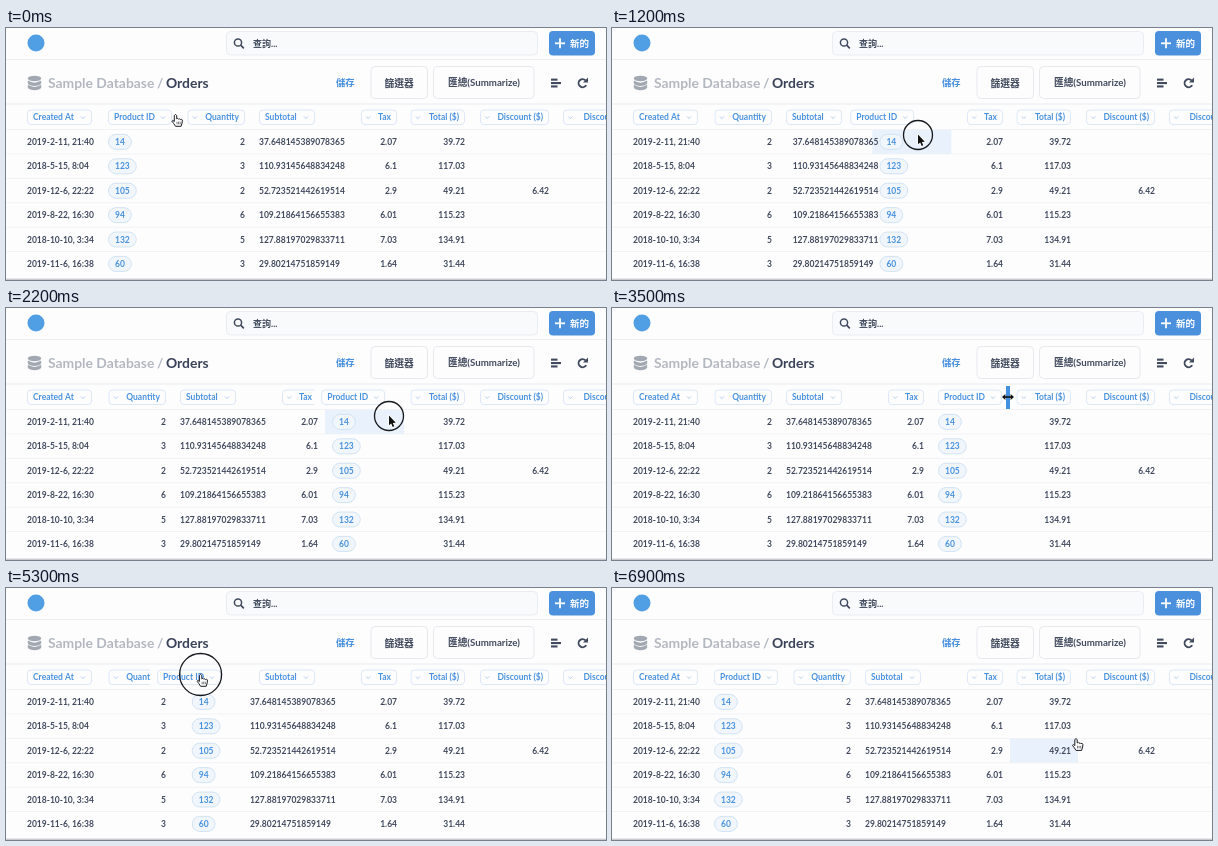
Recreate the animation shown at these times as an HTML page with a canvas. Size 600 px wide and 252 px high, loop 7 s.

```html
<!DOCTYPE html>
<html lang="zh-Hant">
<head>
<meta charset="utf-8">
<title>Orders table</title>
<style>
html, body { margin: 0; width: 100%; height: 100%; overflow: hidden; background: #fdfdfe; }
canvas { display: block; width: 600px; height: 252px; }
</style>
</head>
<body>
<canvas id="stage"></canvas>
<script>
const W = 600, H = 252, LOOP = 7000, STEP = 100;
const FONT = 'Lato, "Noto Sans CJK TC", "Noto Sans CJK JP", "Noto Sans CJK", sans-serif';
const BLUE = '#4a92df', DARK = '#424a5e', GREY = '#b3b8c0', PAGE = '#fdfdfe';
const HEAD_TOP = 76, BODY_TOP = 101.7, ROW_H = 24.4, PAD = 7;

const canvas = document.getElementById('stage');
const ctx = canvas.getContext('2d');
const dpr = window.devicePixelRatio || 1;
canvas.width = W * dpr;
canvas.height = H * dpr;

// swap: [time it gives way to the dragged column, time it returns]
const cols = [
  { name: 'Created At', left: 14, width: 81, pill: 65,
    data: ['2019-2-11, 21:40', '2018-5-15, 8:04', '2019-12-6, 22:22', '2019-8-22, 16:30', '2018-10-10, 3:34', '2019-11-6, 16:38'] },
  { name: 'Product ID', left: 95, width: 79, pill: 64, badge: true,
    data: ['14', '123', '105', '94', '132', '60'] },
  { name: 'Quantity', left: 174, width: 72, pill: 57.5, right: true, swap: [890, 5390],
    data: ['2', '3', '2', '6', '5', '3'] },
  { name: 'Subtotal', left: 246, width: 102, pill: 56, swap: [1070, 5180],
    data: ['37.648145389078365', '110.93145648834248', '52.723521442619514', '109.21864156655383', '127.88197029833711', '29.80214751859149'] },
  { name: 'Tax', left: 348, width: 50, pill: 36, right: true, swap: [1900, 5010],
    data: ['2.07', '6.1', '2.9', '6.01', '7.03', '1.64'] },
  { name: 'Total ($)', left: 398, width: 68, pill: 54.5, right: true,
    data: ['39.72', '117.03', '49.21', '115.23', '134.91', '31.44'] },
  { name: 'Discount ($)', left: 466, width: 84, pill: 69, right: true,
    data: ['', '', '6.42', '', '', ''] },
  { name: 'Discount (%)', left: 550, width: 88, pill: 74, right: true, data: [] }
];
const product = cols[1];
const movers = cols.filter(c => c.swap);

const drags = [
  { from: 800, to: 2400, grip: 74.8, ring: 14.5, arrow: true },
  { from: 4700, to: 6300, grip: 50.5, ring: 21 }
];

// pointer hot spot: time, x, y
const path = [
  [0, 169.5, 86.5], [100, 170, 87], [300, 170, 87], [400, 170.5, 87], [700, 170.5, 87],
  [800, 180, 89], [900, 212, 95], [1000, 268, 104], [1100, 297, 107], [1200, 306, 107],
  [1500, 316, 107], [1700, 339, 108], [1900, 368, 108], [2100, 382, 108], [2300, 384, 108],
  [2400, 392, 100], [2600, 404, 92], [2700, 404, 92], [3100, 400.5, 93], [3300, 397, 89.5],
  [3500, 396, 89], [4000, 395.5, 89], [4200, 393.5, 88], [4300, 392, 87], [4400, 392.5, 87],
  [4600, 392.5, 87], [4700, 377.3, 86.5], [4900, 361, 87], [5000, 345, 87], [5180, 267, 86.5],
  [5300, 194.6, 86.5], [5400, 177, 87], [5600, 155, 89], [6200, 134, 95], [6400, 190, 108],
  [6600, 340, 134], [6800, 446, 149], [6900, 464, 150.6], [7000, 464, 150.6]
];

function pointerAt(t) {
  let i = 0;
  while (i < path.length - 2 && path[i + 1][0] <= t) i++;
  const [t0, x0, y0] = path[i], [t1, x1, y1] = path[i + 1];
  const p = (t - t0) / (t1 - t0);
  return { x: x0 + (x1 - x0) * p, y: y0 + (y1 - y0) * p };
}

// CSS "ease": cubic-bezier(.25, .1, .25, 1)
function ease(x) {
  if (x <= 0) return 0;
  if (x >= 1) return 1;
  let lo = 0, hi = 1, u = 0.5;
  for (let i = 0; i < 20; i++) {
    u = (lo + hi) / 2;
    const bx = 0.75 * u * (1 - u) + u ** 3;
    if (bx < x) lo = u; else hi = u;
  }
  return 0.3 * u * (1 - u) ** 2 + 3 * u * u * (1 - u) + u ** 3;
}

// Left edge of every column; cells glide for `span` ms, headers snap
function layout(t, span) {
  const lefts = new Map(cols.map(c => [c, c.left]));
  let x = product.left;
  for (const c of movers) {
    const [out, back] = c.swap;
    const s = ease((t - out) / span) - ease((t - back) / span);
    lefts.set(c, c.left - product.width * s);
    x += c.width * s;
  }
  lefts.set(product, x);
  return lefts;
}

function text(str, x, cy, size, color, align = 'left') {
  ctx.font = `700 ${size}px ${FONT}`;
  ctx.textAlign = align;
  ctx.fillStyle = color;
  ctx.fillText(str, x, cy + size * 0.36);
}

function rect(x, y, w, h, color) {
  ctx.fillStyle = color;
  ctx.fillRect(x, y, w, h);
}

function box(x, y, w, h, r, fill, stroke, line = 1) {
  ctx.beginPath();
  ctx.roundRect(x, y, w, h, r);
  if (fill) { ctx.fillStyle = fill; ctx.fill(); }
  if (stroke) { ctx.strokeStyle = stroke; ctx.lineWidth = line; ctx.stroke(); }
}

function line(points, color, width) {
  ctx.beginPath();
  points.forEach(([x, y], i) => i ? ctx.lineTo(x, y) : ctx.moveTo(x, y));
  ctx.strokeStyle = color;
  ctx.lineWidth = width;
  ctx.stroke();
}

function circle(x, y, r, color, width) {
  ctx.beginPath();
  ctx.arc(x, y, r, 0, Math.PI * 2);
  if (width) { ctx.strokeStyle = color; ctx.lineWidth = width; ctx.stroke(); }
  else { ctx.fillStyle = color; ctx.fill(); }
}

function drawTopBar() {
  circle(30, 15, 8.5, '#509ee3');
  box(220.5, 3.5, 311, 23.5, 4, '#f8fafb', '#e9edf1');
  circle(232, 14.5, 3.6, DARK, 1.5);
  line([[234.7, 17.2], [237.8, 20.3]], DARK, 1.7);
  text('查詢...', 247, 15.5, 9, DARK);
  box(543, 3, 46, 24.5, 4, '#4a90dd');
  line([[549, 15.3], [559, 15.3]], '#fff', 1.8);
  line([[554, 10.3], [554, 20.3]], '#fff', 1.8);
  text('新的', 564, 15.3, 9.5, '#fff');
  rect(0, 31, W, 1, '#eeeff2');
}

function drawDatabaseIcon() {
  ctx.fillStyle = '#a2a8b1';
  ctx.beginPath();
  ctx.ellipse(28.5, 50.5, 6.7, 2.7, 0, 0, Math.PI * 2);
  ctx.fill();
  for (const y of [52.6, 56.8]) {
    ctx.beginPath();
    ctx.moveTo(21.8, y);
    ctx.quadraticCurveTo(28.5, y + 4.2, 35.2, y);
    ctx.lineTo(35.2, y + 2.7);
    ctx.bezierCurveTo(34, y + 6.2, 23, y + 6.2, 21.8, y + 2.7);
    ctx.fill();
  }
}

function drawTitleBar() {
  drawDatabaseIcon();
  text('Sample Database', 42, 55, 13.9, GREY);
  text('/', 151, 55, 13.9, GREY);
  text('Orders', 160, 55, 13.9, '#3b4358');
  text('儲存', 330, 55, 9.3, BLUE);
  box(365, 38.5, 56.5, 32, 4, PAGE, '#e7e9ed');
  text('篩選器', 378.5, 55, 9.8, DARK);
  box(427.5, 38.5, 100.5, 32, 4, PAGE, '#e7e9ed');
  text('匯總(Summarize)', 442, 55, 9.7, DARK);

  [6.5, 10, 6.5].forEach((w, i) => rect(545, 50.6 + i * 3.4, w, 2.1, DARK));
  ctx.beginPath();
  ctx.arc(576.6, 55.2, 4, -0.75, 0.5, true);
  ctx.strokeStyle = DARK;
  ctx.lineWidth = 1.9;
  ctx.stroke();
  ctx.fillStyle = DARK;
  ctx.beginPath();
  ctx.moveTo(582, 49.5);
  ctx.lineTo(582, 54.5);
  ctx.lineTo(577, 54.5);
  ctx.fill();
}

function drawCells(col, left) {
  col.data.forEach((value, row) => {
    const cy = BODY_TOP + ROW_H * (row + 0.5);
    if (col.badge) {
      const w = value.length * 4.93 + 14;
      box(left + PAD + 0.5, cy - 7.5, w - 1, 15, 7.5, '#f0f6fc', '#cfe0f1', 0.9);
      text(value, left + PAD + w / 2, cy, 8.5, BLUE, 'center');
    } else if (col.right) {
      text(value, left + col.width - PAD, cy, 8.5, DARK, 'right');
    } else {
      text(value, left + PAD, cy, 8.5, DARK);
    }
  });
}

function drawHover(lefts, p) {
  const row = Math.floor((p.y - BODY_TOP) / ROW_H);
  if (row < 0) return;
  const col = cols.find(c => p.x >= lefts.get(c) && p.x < lefts.get(c) + c.width);
  if (col) rect(lefts.get(col), BODY_TOP + row * ROW_H, col.width, ROW_H, '#e9f2fc');
}

function drawHeader(col, left) {
  const overflow = left + col.width > W;
  const x = col.right && !overflow ? left + col.width - PAD - col.pill : left + PAD;
  const cy = 89.3;
  box(x + 0.5, 82, col.pill - 1, 14.5, 3.5, PAGE, '#d8e6f5', 0.9);
  text(col.name, x + (col.right ? col.pill - 6 : 6), cy, 8.5, BLUE, col.right ? 'right' : 'left');
  const cx = x + (col.right ? 7.3 : col.pill - 9);
  line([[cx - 2, cy - 0.8], [cx, cy + 1.2], [cx + 2, cy - 0.8]], '#a9c9ec', 0.9);
}

function drawTable(t, p, drag) {
  const cells = layout(t, 200), heads = layout(t, 0.001);
  rect(0, HEAD_TOP - 0.5, W, 1, '#e9ebef');
  drawHover(cells, p);
  for (let row = 0; row < 6; row++) rect(0, BODY_TOP + ROW_H * row - 0.5, W, 0.8, '#f0f1f4');
  for (const c of cols) drawCells(c, cells.get(c));
  for (const c of cols) if (c !== product) drawHeader(c, heads.get(c));

  let left = heads.get(product);
  if (drag) {
    left = Math.min(p.x - drag.grip, 319);
    rect(left, HEAD_TOP + 1, product.width, 24, PAGE);
  }
  drawHeader(product, left);
  rect(0, 250.6, W, 1.4, '#c9cbcf');
}

function drawArrow() {
  ctx.beginPath();
  ctx.moveTo(0, -0.5);
  for (const [x, y] of [[0, 9.3], [2.2, 7.4], [3.7, 10.9], [5.3, 10.2], [3.8, 6.9], [6.8, 6.7]]) ctx.lineTo(x, y);
  ctx.closePath();
  ctx.strokeStyle = '#fff';
  ctx.lineWidth = 1.4;
  ctx.stroke();
  ctx.fillStyle = '#111';
  ctx.fill();
}

function drawHand() {
  ctx.beginPath();
  ctx.moveTo(-1.2, 7);
  ctx.lineTo(-1.2, 1);
  ctx.quadraticCurveTo(0, -1, 1.2, 1);
  ctx.lineTo(1.2, 4.3);
  for (const x of [1.2, 3.1, 5]) {
    const y = 3.6 + x * 0.22;
    ctx.quadraticCurveTo(x + 1, y - 0.8, x + 1.9, y + 0.9);
  }
  ctx.lineTo(6.6, 8.4);
  ctx.lineTo(5.6, 11.8);
  ctx.lineTo(0, 11.8);
  ctx.quadraticCurveTo(-1.6, 9, -3.6, 6.8);
  ctx.quadraticCurveTo(-3, 5, -1.2, 7);
  ctx.closePath();
  ctx.fillStyle = '#fff';
  ctx.fill();
  ctx.strokeStyle = '#1b1d22';
  ctx.lineWidth = 1;
  ctx.stroke();
  for (const x of [1.5, 3.1, 4.7]) line([[x, 7.2], [x, 9.8]], '#1b1d22', 0.6);
}

function drawResize() {
  line([[-4, 0], [4, 0]], '#111', 1.6);
  ctx.fillStyle = '#111';
  for (const s of [-1, 1]) {
    ctx.beginPath();
    ctx.moveTo(s * 6, 0);
    ctx.lineTo(s * 2.6, -3);
    ctx.lineTo(s * 2.6, 3);
    ctx.fill();
  }
}

function drawPointer(t, p, drag) {
  const resizing = t >= 2800 && t < 4300 && Math.abs(p.x - 396) < 3.5;
  if (resizing) rect(394, 78, 4, 23, '#4290df');
  if (drag) circle(p.x, p.y, drag.ring, '#16181c', 1.3);
  ctx.save();
  ctx.translate(p.x, p.y);
  if (resizing) drawResize();
  else if (drag && drag.arrow) drawArrow();
  else drawHand();
  ctx.restore();
}

function frame(now) {
  const t = Math.floor((now % LOOP) / STEP) * STEP;
  const p = pointerAt(t);
  const drag = drags.find(d => t >= d.from && t < d.to);
  ctx.setTransform(dpr, 0, 0, dpr, 0, 0);
  rect(0, 0, W, H, PAGE);
  drawTopBar();
  drawTitleBar();
  drawTable(t, p, drag);
  drawPointer(t, p, drag);
  requestAnimationFrame(frame);
}
requestAnimationFrame(frame);
</script>
</body>
</html>
```
